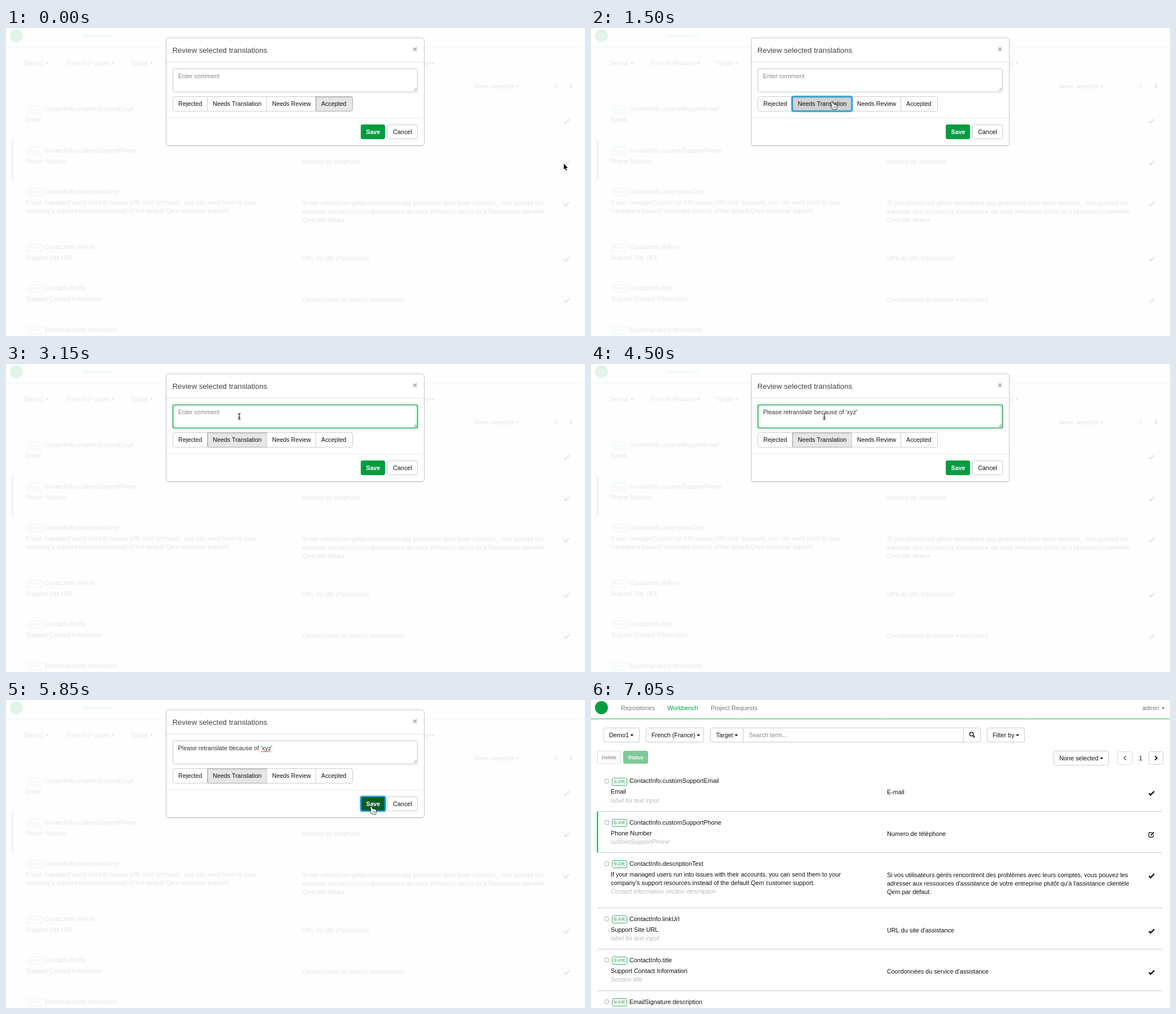
Recreate the animation shown at these times as an HTML page with a canvas. Size 1025x546 px, loop 8700 ms.

```html
<!DOCTYPE html>
<html lang="en">
<head>
<meta charset="utf-8">
<title>Review translations</title>
<style>
  html, body { margin: 0; width: 100%; height: 100%; overflow: hidden; background: #fff; }
  canvas { display: block; }
</style>
</head>
<body>
<canvas id="stage" width="1025" height="546"></canvas>
<script>
const ctx = document.getElementById('stage').getContext('2d');
const LOOP = 8700, STEP = 150, SIZE = 10.85;
const GREEN = '#009c41', INK = '#111', NONE = 'transparent';
const COMMENT = "Please retranslate because of 'xyz'";

const rows = [
  { y: 124, key: 'ContactInfo.customSupportEmail', source: ['Email'],
    note: 'label for text input', target: ['E-mail'] },
  { y: 197.5, key: 'ContactInfo.customSupportPhone', source: ['Phone Number'],
    note: 'customSupportPhone', target: ['Numero de téléphone'] },
  { y: 270.5, key: 'ContactInfo.descriptionText',
    source: ['If your managed users run into issues with their accounts, you can send them to your',
             "company's support resources instead of the default Qem customer support."],
    note: 'Contact information section description',
    target: ['Si vos utilisateurs gérés rencontrent des problèmes avec leurs comptes, vous pouvez les',
             "adresser aux ressources d'assistance de votre entreprise plutôt qu'à l'assistance clientèle",
             'Qem par défaut.'] },
  { y: 368.5, key: 'ContactInfo.linkUrl', source: ['Support Site URL'],
    note: 'label for text input', target: ["URL du site d'assistance"] },
  { y: 441.5, key: 'ContactInfo.title', source: ['Support Contact Information'],
    note: 'Section title', target: ["Coordonnées du service d'assistance"] },
  { y: 515.5, key: 'EmailSignature.description', source: [], target: [] }
];

const choices = [
  { label: 'Rejected', x: 295.5, end: 356.5, radius: [3, 0, 0, 3] },
  { label: 'Needs Translation', x: 356.5, end: 461.5, radius: 0 },
  { label: 'Needs Review', x: 461.5, end: 548.5, radius: 0 },
  { label: 'Accepted', x: 548.5, end: 613.5, radius: [0, 3, 3, 0] }
];

// Pointer track: time, x, y
const track = [
  [0, 987, 240], [150, 965, 236], [300, 820, 200], [450, 600, 146], [600, 476, 126],
  [750, 440, 130], [900, 428, 131], [1800, 428, 131], [1950, 417, 108], [2100, 413, 93],
  [4800, 413, 93], [5400, 632, 201], [5550, 648, 190], [5700, 648, 189], [LOOP, 648, 189]
];

const arrow = new Path2D('M.5 .5V11L2.9 8.7 4.5 12.5 6 11.9 4.4 8.1H7.6Z');
const hand = new Path2D('M-3 1.2C-2.2 0-.8.4-.4 1.6L.8 4.6 2 4.2 3 5 4.2 4.6 5.2 5.6 6.4 5.4' +
  'C7.4 6 7.6 7.6 7.3 9L6.4 13H.6L-3 9.2C-3.8 8-3.4 7-2 7.6L-1 8.2Z');

function text(str, x, y, color = INK, size = SIZE, style = '') {
  ctx.font = `${style} ${size}px "Liberation Sans", Arial, sans-serif`;
  ctx.fillStyle = color;
  ctx.fillText(str, x, y);
  return x + ctx.measureText(str).width;
}

function panel(x, y, right, bottom, fill, stroke, radius = 2.5) {
  ctx.beginPath();
  ctx.roundRect(x, y, right - x, bottom - y, radius);
  ctx.fillStyle = fill;
  ctx.fill();
  ctx.lineWidth = 1;
  ctx.strokeStyle = stroke;
  ctx.stroke();
}

function line(color, width, ...points) {
  ctx.beginPath();
  points.forEach(([x, y]) => ctx.lineTo(x, y));
  ctx.lineWidth = width;
  ctx.strokeStyle = color;
  ctx.stroke();
}

function caretDown(x, y, color = INK) {
  ctx.fillStyle = color;
  ctx.beginPath();
  ctx.moveTo(x, y - 1.5);
  ctx.lineTo(x + 6, y - 1.5);
  ctx.lineTo(x + 3, y + 1.7);
  ctx.fill();
}

function dropdown(label, x, right, y, bottom, border) {
  panel(x, y, right, bottom, NONE, border);
  const mid = Math.floor((y + bottom) / 2);
  caretDown(text(label, x + 9.5, mid + 4) + 2.5, mid + 0.5);
}

function glow(x, y, right, bottom, color, width, blur, alpha = 1) {
  ctx.save();
  ctx.globalAlpha *= alpha;
  ctx.shadowColor = color;
  ctx.shadowBlur = blur;
  ctx.beginPath();
  ctx.roundRect(x, y, right - x, bottom - y, 3);
  ctx.strokeStyle = color;
  ctx.lineWidth = width;
  ctx.stroke();
  ctx.restore();
}

function editIcon(x, y) {
  ctx.lineWidth = 1.4;
  ctx.strokeStyle = '#222';
  ctx.beginPath();
  ctx.roundRect(x - 4.5, y - 3.5, 8, 8, 1.5);
  ctx.stroke();
  line('#fff', 4, [x, y + 1], [x + 5, y - 4]);
  line('#222', 2.2, [x - 1, y + 1.5], [x + 4.5, y - 4]);
}

function drawPage(dim, edited) {
  const pale = color => dim ? NONE : color;
  const border = pale('#ccc'), grey = pale('#777');

  ctx.fillStyle = GREEN;
  ctx.beginPath();
  ctx.arc(18.5, 13.5, 11.5, 0, 7);
  ctx.fill();
  text('Repositories', 53, 18, grey);
  text('Workbench', 135, 18, GREEN);
  text('Project Requests', 212, 18, grey);
  text('admin', 976, 18, grey);
  caretDown(1010, 14.5, grey);
  line('#3aaa68', 1, [0, 33.5], [1025, 33.5]);

  dropdown('Demo1', 22.5, 85.5, 49.5, 74.5, border);
  dropdown('French (France)', 97.5, 199.5, 49.5, 74.5, border);
  panel(211.5, 49.5, 689.5, 74.5, NONE, border);
  line(border, 1, [269.5, 49.5], [269.5, 74.5]);
  line(border, 1, [659.5, 49.5], [659.5, 74.5]);
  caretDown(text('Target', 221.5, 66) + 2.5, 62.5);
  text('Search term...', 279.5, 66, '#888');
  ctx.beginPath();
  ctx.arc(673.7, 60.5, 3.3, 0, 7);
  ctx.lineWidth = 1.6;
  ctx.strokeStyle = '#222';
  ctx.stroke();
  line('#222', 2, [676, 63], [679.5, 66.5]);
  dropdown('Filter by', 701.5, 767.5, 49.5, 74.5, border);

  panel(11.5, 90.5, 52.5, 112.5, NONE, pale('#ddd'));
  text('Delete', 19, 105, grey, 9);
  panel(57.5, 90.5, 100.5, 112.5, pale('#7fc898'), pale('#7fc898'));
  text('Status', 65.5, 105, pale('#fff'), 9, 'bold');
  dropdown('None selected', 819.5, 916.5, 90.5, 115.5, border);
  panel(932.5, 91.5, 958.5, 114.5, NONE, pale('#ddd'));
  panel(987.5, 91.5, 1012.5, 114.5, NONE, border);
  line(pale('#777'), 1.8, [947, 99.5], [943.5, 103], [947, 106.5]);
  line('#222', 2, [998.5, 99.5], [1002, 103], [998.5, 106.5]);
  text('1', 970, 107);

  rows.forEach((row, i) => {
    const { y } = row, top = Math.floor(y);
    if (i) line(border, 1, [11, top + 0.5], [1011, top + 0.5]);
    panel(24.5, top + 16.5, 31.5, top + 23.5, pale('#fff'), pale('#aaa'), 2);
    panel(37.5, top + 14.5, 63.5, top + 27.5, NONE, '#35ad67', 2);
    text('fr-FR', 41, top + 24, '#2d9c5b', 8.3);
    text(row.key, 68, Math.floor(y + 23.9));
    row.source.forEach((s, n) => text(s, 35, Math.floor(y + 42.7 + n * 15.3)));
    row.target.forEach((s, n) => text(s, 524, Math.floor(y + 43.7 + n * 15.3)));
    if (!row.note) return;
    text(row.note, 35, Math.floor(y + 42.7 + row.source.length * 15.3), pale('#bbb'), SIZE, 'italic');
    if (i === 1 && edited) editIcon(992, y + 41);
    else line('#222', 2.6, [987.8, y + 41.5], [990.7, y + 44.4], [997, y + 37.8]);
  });
  line(dim ? '#555' : '#1aa052', 2, [11.5, 198], [11.5, 270]);
}

function drawChoice({ label, x, end, radius }, pressed, focused, hover) {
  panel(x, 121.5, end, 147.5, focused ? '#d2d2d2' : pressed || hover ? '#e6e6e6' : '#fff',
        pressed || hover ? '#adadad' : '#ccc', radius);
  if (pressed) line('rgba(0,0,0,.08)', 2, [x + 1, 146], [x + 1, 123], [end - 1, 123]);
  text(label, x + 9.5, 138, INK, 10.7);
}

function drawModal(t, px, py) {
  line('rgba(0,0,0,.1)', 1, [286, 209.5], [738, 209.5]);
  panel(283.5, 17.5, 740.5, 208.5, '#fff', '#c2c2c2', 4);
  line('#e5e5e5', 1, [284, 60.5], [740, 60.5]);
  line('#e5e5e5', 1, [284, 159.5], [740, 159.5]);
  text('Review selected translations', 294.5, 44, '#444', 13.25);
  line('#b0b0b0', 2, [721, 34.8], [727, 40.8]);
  line('#b0b0b0', 2, [727, 34.8], [721, 40.8]);

  panel(295.5, 72.5, 728.5, 113.5, '#fff', '#c4c4c4', 3);
  const ring = t >= 2700 && t < 5700 ? 1 : t === 5700 ? 0.4 : 0;
  if (ring) glow(295.5, 72.5, 728.5, 113.5, '#12a04c', 1.1, 4, ring);
  line('#777', 0.8, [721.5, 111.5], [727, 106]);
  line('#777', 0.8, [724.5, 111.5], [727, 109]);
  const typed = t >= 4050;
  const end = text(typed ? COMMENT : 'Enter comment', 304.5, 89, typed ? '#333' : '#888');
  const caretOn = [[2550, 3150], [3750, 4500], [5100, 5700]].some(([a, b]) => t >= a && t < b);
  if (caretOn) {
    const x = typed ? Math.floor(end) + 0.5 : 305.5;
    line('#333', 1, [x, 79], [x, 92]);
  }
  if (t >= 5700) {
    ctx.setLineDash([2, 1]);
    line('#e33', 1.3, [end - 20, 91.5], [end - 2, 91.5]);
    ctx.setLineDash([]);
  }

  const focused = t >= 1200 && t < 2550;
  choices.forEach((choice, i) => {
    const hover = py > 121 && py < 148 && px >= choice.x && px < choice.end;
    const pressed = i === 1 ? t >= 1200 : i === 3 && t < 1500;
    drawChoice(choice, pressed, i === 1 && focused, hover);
  });
  if (focused) glow(356, 121.5, 462, 147.5, '#269bd3', 2.2, 2);

  const saveHover = px > 627 && px < 672 && py > 170 && py < 198;
  const saveFocus = t >= 5700;
  const saveFill = saveFocus ? '#0b5c28' : saveHover ? '#006f2e' : GREEN;
  panel(628.5, 171.5, 670.5, 196.5, saveFill, saveFill);
  if (saveFocus) glow(628, 171, 671.5, 197, '#269bd3', 2.2, 2);
  text('Save', 637.5, 188, '#fff', 10.7, 'bold');
  panel(675.5, 171.5, 728.5, 196.5, '#fff', '#ccc');
  text('Cancel', 685, 188);
}

function pointerAt(t) {
  const i = track.findIndex(([time]) => time > t);
  const [a, ax, ay] = track[i - 1], [b, bx, by] = track[i];
  const k = (t - a) / (b - a);
  return [ax + (bx - ax) * k, ay + (by - ay) * k];
}

function drawPointer(x, y, modalOpen) {
  const overText = y > 72 && y < 114 && x > 295 && x < 729;
  const overButton = (y > 121 && y < 148 && x > 295 && x < 614) ||
                     (y > 170 && y < 198 && x > 627 && x < 729);
  ctx.save();
  ctx.translate(x, y);
  if (modalOpen && overText) {
    for (const [color, width] of [['#fff', 2.6], ['#222', 1.2]]) {
      line(color, width, [-2.5, -5.5], [0, -4.5], [2.5, -5.5]);
      line(color, width, [0, -5], [0, 5]);
      line(color, width, [-2.5, 5.5], [0, 4.5], [2.5, 5.5]);
      line(color, width, [-1.8, 1.5], [1.8, 1.5]);
    }
  } else {
    const isHand = modalOpen && overButton;
    const shape = isHand ? hand : arrow;
    ctx.lineJoin = 'round';
    ctx.lineWidth = isHand ? 1.5 : 1.6;
    ctx.strokeStyle = isHand ? '#111' : '#fff';
    ctx.fillStyle = isHand ? '#fff' : '#000';
    ctx.stroke(shape);
    ctx.fill(shape);
    if (isHand) [1, 3, 5].forEach(n => line('#333', 0.7, [n, 8], [n, 11]));
  }
  ctx.restore();
}

function draw(now) {
  const t = Math.floor(now % LOOP / STEP) * STEP;
  const open = t < 6150 ? 1 : t < 6300 ? 0.5 : 0;
  const [px, py] = pointerAt(t);
  ctx.fillStyle = '#fff';
  ctx.fillRect(0, 0, 1025, 546);
  drawPage(open === 1, t >= 6600);
  if (open) {
    ctx.fillStyle = `rgba(254,254,254,${0.89 * open})`;
    ctx.fillRect(0, 0, 1025, 546);
    ctx.globalAlpha = open;
    drawModal(t, px, py);
    ctx.globalAlpha = 1;
  }
  if (t < 6600) drawPointer(px, py, open > 0);
}

const start = performance.now();
function tick() {
  draw(performance.now() - start);
  requestAnimationFrame(tick);
}
tick();
</script>
</body>
</html>
```
